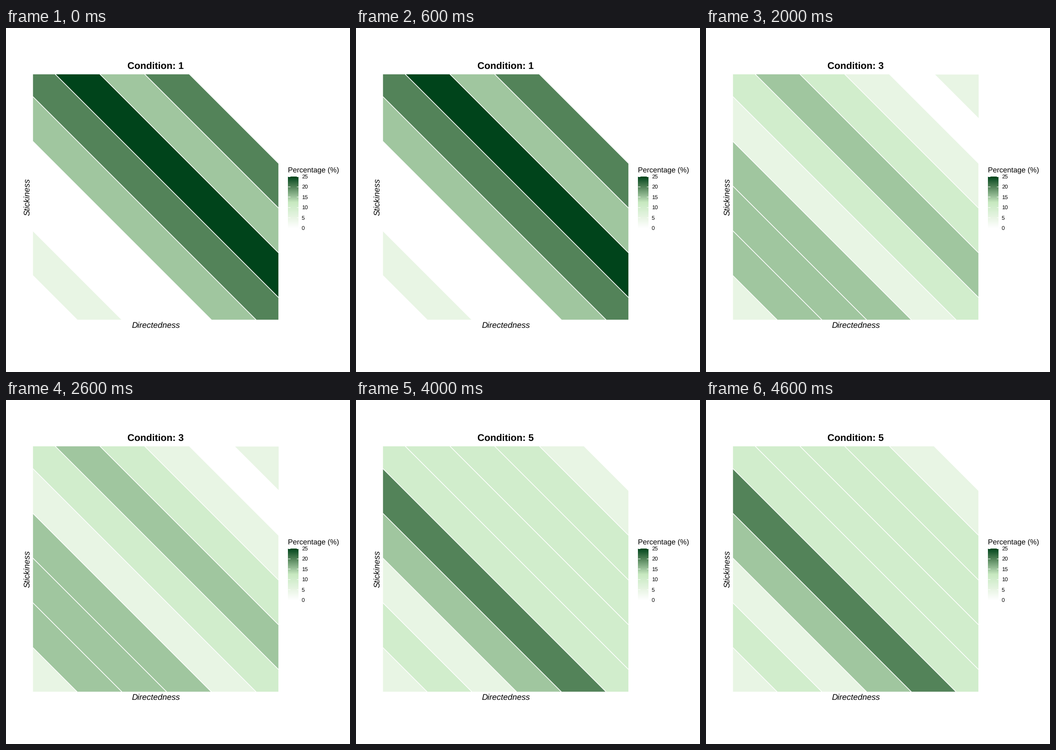
A matplotlib script that plays this animation: 748x748 px, repeating every 5 s.

```python
import matplotlib.pyplot as plt
import numpy as np
from matplotlib.animation import FuncAnimation
from matplotlib.colors import LinearSegmentedColormap
from matplotlib.patches import Polygon

STAGE, DPI = 748, 100
PX = 72 / DPI                      # points per pixel
LEFT, TOP, SIDE = 58, 100, 535     # panel square
BANDS = 11
STEP = 2 * SIDE / BANDS

# Percentage per diagonal, bottom-left corner to top-right corner
CONDITIONS = [
    [0, 5, 0, 0, 15, 20, 25, 15, 20, 0, 0],
    [0, 10, 10, 10, 15, 10, 10, 15, 5, 15, 0],
    [5, 15, 15, 15, 5, 10, 15, 10, 5, 0, 5],
    [10, 0, 15, 10, 15, 15, 10, 20, 0, 5, 0],
    [5, 10, 5, 15, 20, 10, 10, 10, 10, 5, 0],
]

GREENS = LinearSegmentedColormap.from_list("greens", [
    (0.0, "#ffffff"), (0.2, "#e8f5e4"), (0.4, "#d1edcc"), (0.5, "#c7e9c0"),
    (0.6, "#a0c69f"), (0.8, "#538359"), (1.0, "#00441b")], N=512)

plt.rcParams["font.family"] = "Liberation Sans"
plt.rcParams["text.hinting"] = "none"
plt.rcParams["text.hinting_factor"] = 1

fig = plt.figure(figsize=(STAGE / DPI, STAGE / DPI), dpi=DPI, facecolor="white")
ax = fig.add_axes([0, 0, 1, 1])
ax.axis("off")


def label(x, y, text, size, ha="center", **style):
    return ax.text(x, y, text, fontsize=size * PX, ha=ha,
                   va="baseline", color="black", **style)


def diagonal(d):
    """Ends of the line x - y = d inside the panel."""
    up, down = max(d, 0), max(-d, 0)
    return (up, down), (SIDE - down, SIDE - up)


def band(i):
    lo, hi = i * STEP - SIDE, (i + 1) * STEP - SIDE
    (a, b), (c, d) = diagonal(lo), diagonal(hi)
    middle = lo < 0 < hi
    points = [a] + [(0, 0)] * middle + [c, d] + [(SIDE, SIDE)] * middle + [b]
    return Polygon(np.array(points) + (LEFT, TOP), closed=True,
                   edgecolor="white", linewidth=1.4 * PX, joinstyle="miter")


def legend(x0=613.5, x1=636.5, y0=322.5, y1=434.5):
    ramp = np.linspace(1, 0, 256)[:, None]
    ax.imshow(ramp, cmap=GREENS, vmin=0, vmax=1, extent=(x0, x1, y1, y0),
              aspect="auto", interpolation="bilinear")
    tick = (x1 - x0) / 5
    for value in range(0, 26, 5):
        y = y1 - (y1 - y0) * value / 25
        label(643, y + 4.4, str(value), 12, ha="left")
        for x in (x0, x1 - tick):
            ax.plot([x, x + tick], [y, y], color="white",
                    linewidth=PX, solid_capstyle="butt")
    label(613.5, 314, "Percentage (%)", 15.6, ha="left")


legend()
bands = [ax.add_patch(band(i)) for i in range(BANDS)]
title = label(325, 88.7, "", 21, weight="bold")
label(326, 652, "Directedness", 18.3, style="italic")
label(51, 367, "Stickiness", 18.3, style="italic", rotation=90,
      rotation_mode="anchor")
ax.set_xlim(0, STAGE)
ax.set_ylim(STAGE, 0)


def update(i):
    title.set_text(f"Condition: {i + 1}")
    for patch, value in zip(bands, CONDITIONS[i]):
        patch.set_facecolor(GREENS(value / 25))
    return [title, *bands]


anim = FuncAnimation(fig, update, frames=len(CONDITIONS), interval=1000,
                     repeat=True, repeat_delay=0, blit=False)
plt.show()
```
